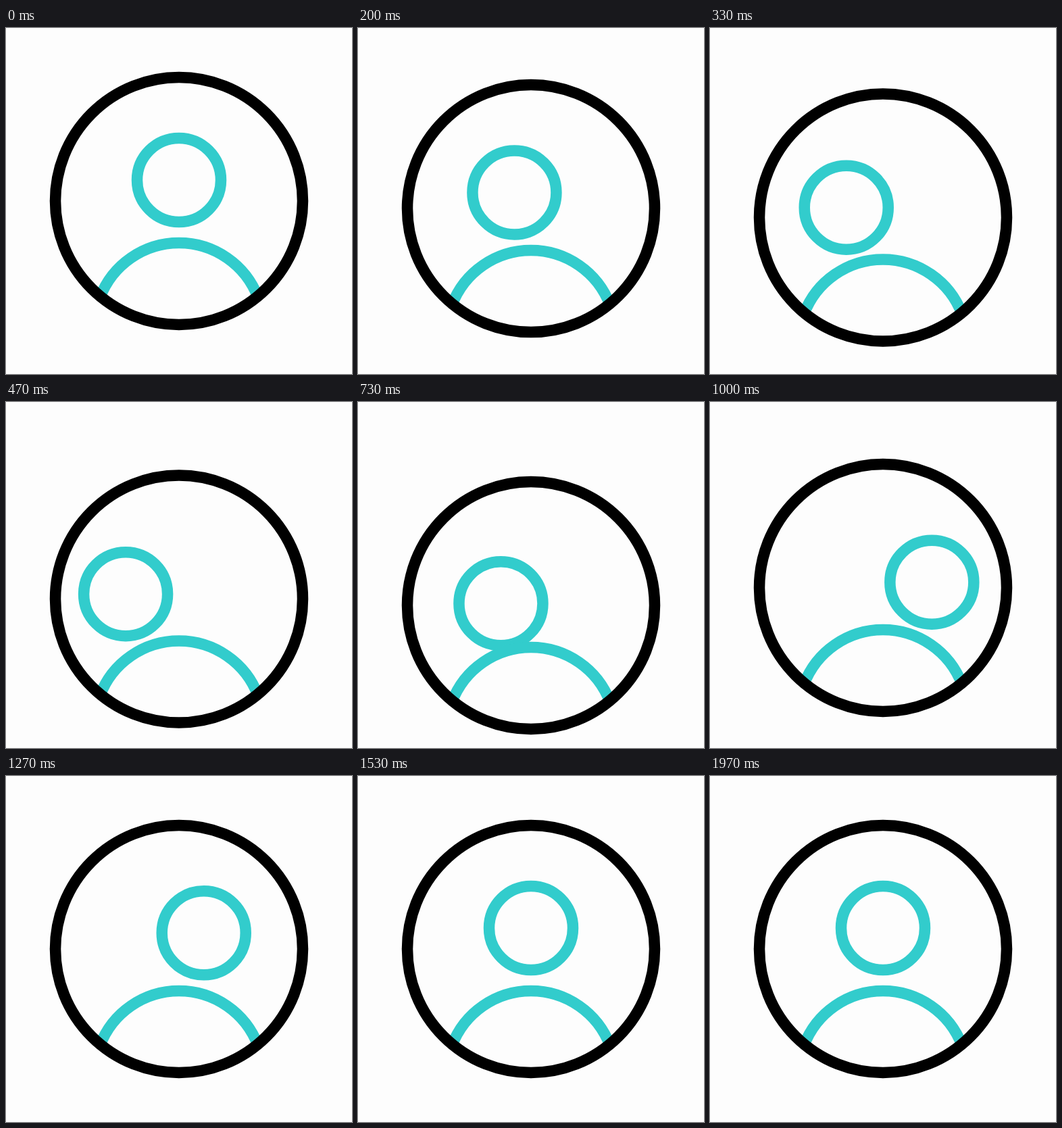
These frames come from a looping animation (512x512 px, 2010 ms). An HTML page:

```html
<!DOCTYPE html>
<html lang="en">
<head>
<meta charset="utf-8">
<title>Rolling avatar</title>
<style>
  html, body { margin: 0; width: 100%; height: 100%; overflow: hidden; background: #fdfdfd; }
  svg { display: block; width: 100vw; height: 100vh; }
  svg * { fill: none; stroke: #32cccc; stroke-width: 16.5; }
  #badge .ring { stroke: #000; }
</style>
</head>
<body>
<svg viewBox="0 0 512 512">
  <circle id="head" cx="256" cy="225" r="62"/>
  <g id="badge">
    <path d="M139 399A125 125 0 0 1 373 399"/>
    <circle class="ring" cx="256" cy="256" r="183"/>
  </g>
</svg>
<script>
const LOOP = 2010, STEP = 100 / 3;

const ease = u => u * u * (3 - 2 * u);

// Eases through [step, value] keys, starting from rest at zero
function follow(step, ...keys) {
  let t0 = 0, from = 0;
  for (const [t1, to] of keys) {
    if (step < t1) return from + (to - from) * ease((step - t0) / (t1 - t0));
    [t0, from] = [t1, to];
  }
  return from;
}

const badgeDrop = s => follow(s, [17, 38.7], [20.5, 46], [37.5, 0]);
const headSwing = s => follow(s, [17, -86], [32.6, 85], [42.5, 0]);
const headDrop = s => follow(s, [17, 64.5], [18.8, 77], [42.5, 0]);

const head = document.getElementById("head");
const badge = document.getElementById("badge");
const move = (el, x, y) => el.setAttribute("transform", `translate(${x} ${y})`);

function draw(time) {
  const step = Math.floor((time % LOOP + 4) / STEP);
  move(badge, 0, badgeDrop(step));
  move(head, headSwing(step), headDrop(step));
}

const start = performance.now();
function tick() {
  draw(performance.now() - start);
  requestAnimationFrame(tick);
}
tick();
</script>
</body>
</html>
```
